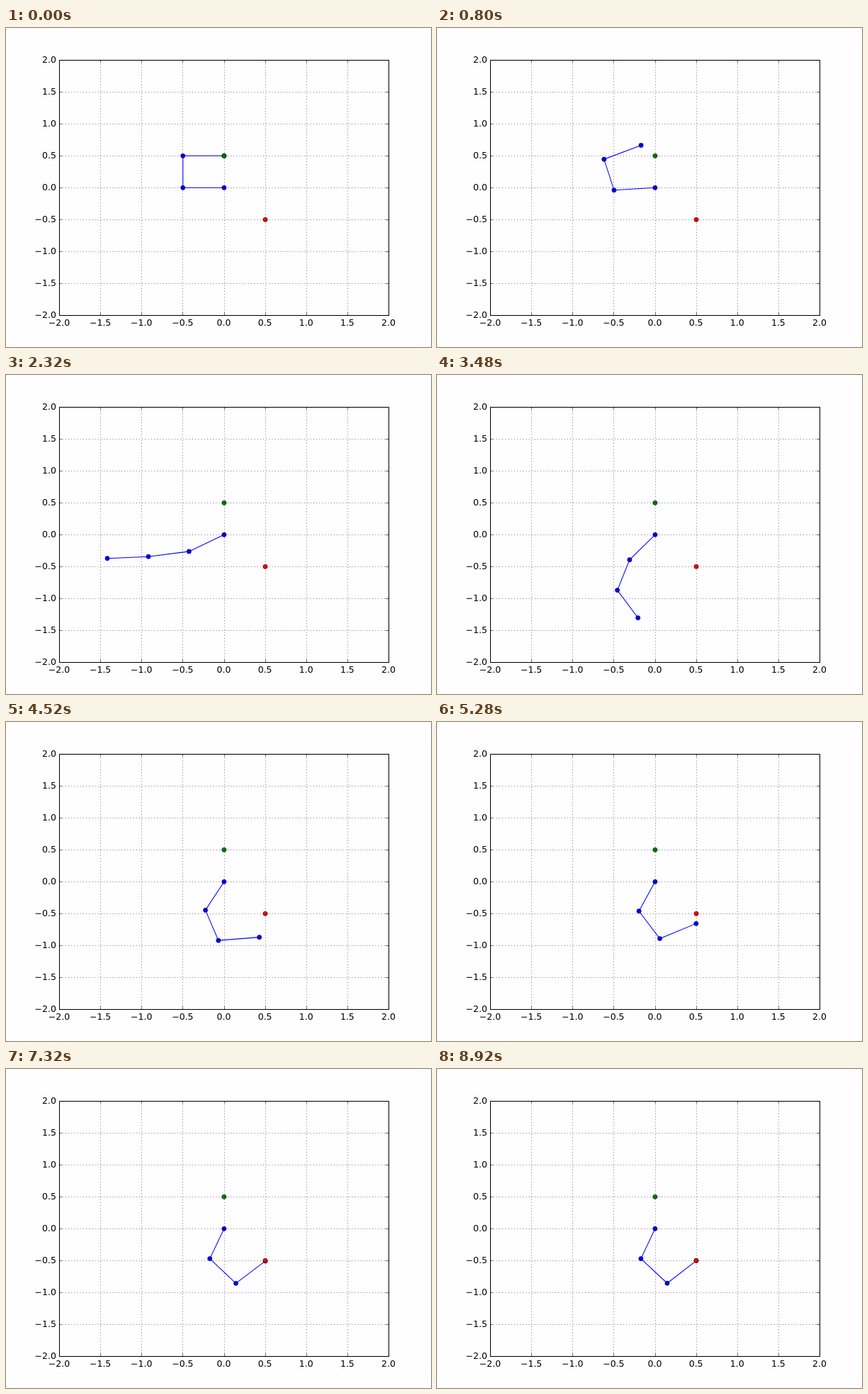
Recreate the animation shown at these times as an HTML page with a canvas. Size 600 by 450 pixels, loop 9 s.

```html
<!DOCTYPE html>
<html lang="en">
<head>
<meta charset="utf-8">
<title>Three-joint arm</title>
<style>
  html, body { margin: 0; width: 100%; height: 100%; overflow: hidden; background: #fefdff; }
  canvas { display: block; }
</style>
</head>
<body>
<canvas id="stage" width="600" height="450"></canvas>
<script>
const ctx = document.getElementById('stage').getContext('2d');
const LOOP = 9000, TICK = 40, STEPS_PER_TICK = 0.6;
const BOX = { left: 75, top: 45, right: 540, bottom: 405 };
const PT = 75 / 72;
const LINK = 0.5;
const START_ANGLES = [180, 90, 0];
const GOAL_ANGLES = [249.87, 309.68, 405.12];
const TICKS = Array.from({ length: 9 }, (_, i) => -2 + i / 2);

const toX = x => 307.5 + x * 116.25;
const toY = y => 225 - y * 90;
const snap = v => Math.floor(v + 0.5) + 0.5;

function line(points, color, width, dash = []) {
  ctx.beginPath();
  points.forEach(([x, y]) => ctx.lineTo(x, y));
  ctx.strokeStyle = color;
  ctx.lineWidth = width;
  ctx.setLineDash(dash);
  ctx.stroke();
}

function dot([x, y], color) {
  ctx.beginPath();
  ctx.arc(toX(x) + 0.4, toY(y) + 0.3, 3 * PT, 0, 2 * Math.PI);
  ctx.fillStyle = color;
  ctx.fill();
  ctx.strokeStyle = '#000';
  ctx.lineWidth = 0.5 * PT;
  ctx.setLineDash([]);
  ctx.stroke();
}

// The gain grows by 0.001 with every step of the controller.
function progress(step) {
  let remaining = 1;
  for (let i = 0; i < step; i++) remaining *= 1 - 0.001 * i;
  return 1 - remaining;
}

function armJoints(s) {
  const joints = [[0, 0]];
  START_ANGLES.forEach((start, i) => {
    const angle = (start + (GOAL_ANGLES[i] - start) * s) * Math.PI / 180;
    const [x, y] = joints[i];
    joints.push([x + LINK * Math.cos(angle), y + LINK * Math.sin(angle)]);
  });
  return joints;
}

function drawAxes() {
  const { left, top, right, bottom } = BOX;
  const thin = 0.5 * PT, size = 4 * PT, dash = [PT, 3 * PT];
  ctx.font = '12.5px "DejaVu Sans", sans-serif';
  ctx.fillStyle = '#000';
  for (const value of TICKS) {
    const x = snap(toX(value)), y = snap(toY(value));
    if (Math.abs(value) < 2) {
      line([[x, bottom + 0.5], [x, top + 0.5]], '#000', thin, dash);
      line([[left + 0.5, y], [right + 0.5, y]], '#000', thin, dash);
      line([[x, bottom], [x, bottom - size]], '#000', thin);
      line([[x, top], [x, top + size]], '#000', thin);
      line([[left, y], [left + size, y]], '#000', thin);
      line([[right, y], [right - size, y]], '#000', thin);
    }
    const label = value.toFixed(1).replace('-', '\u2212');
    ctx.textAlign = 'center';
    ctx.fillText(label, toX(value), 420);
    ctx.textAlign = 'right';
    ctx.fillText(label, left - size, toY(value) + 4.4);
  }
  ctx.lineWidth = PT;
  ctx.setLineDash([]);
  ctx.strokeRect(left + 0.5, top + 0.5, right - left, bottom - top);
}

function draw(time) {
  const tick = Math.floor((time % LOOP) / TICK);
  const step = Math.floor((tick + 0.5) * STEPS_PER_TICK);
  const joints = armJoints(progress(step));
  ctx.fillStyle = '#fefdff';
  ctx.fillRect(0, 0, 600, 450);
  line(joints.map(([x, y]) => [toX(x) + 0.4, toY(y) + 0.3]), '#00f', PT);
  joints.forEach(joint => dot(joint, '#00f'));
  dot([0, 0.5], '#008000');
  dot([0.5, -0.5], '#f00');
  drawAxes();
}

const began = performance.now();
function animate() {
  draw(performance.now() - began);
  requestAnimationFrame(animate);
}
animate();
</script>
</body>
</html>
```
